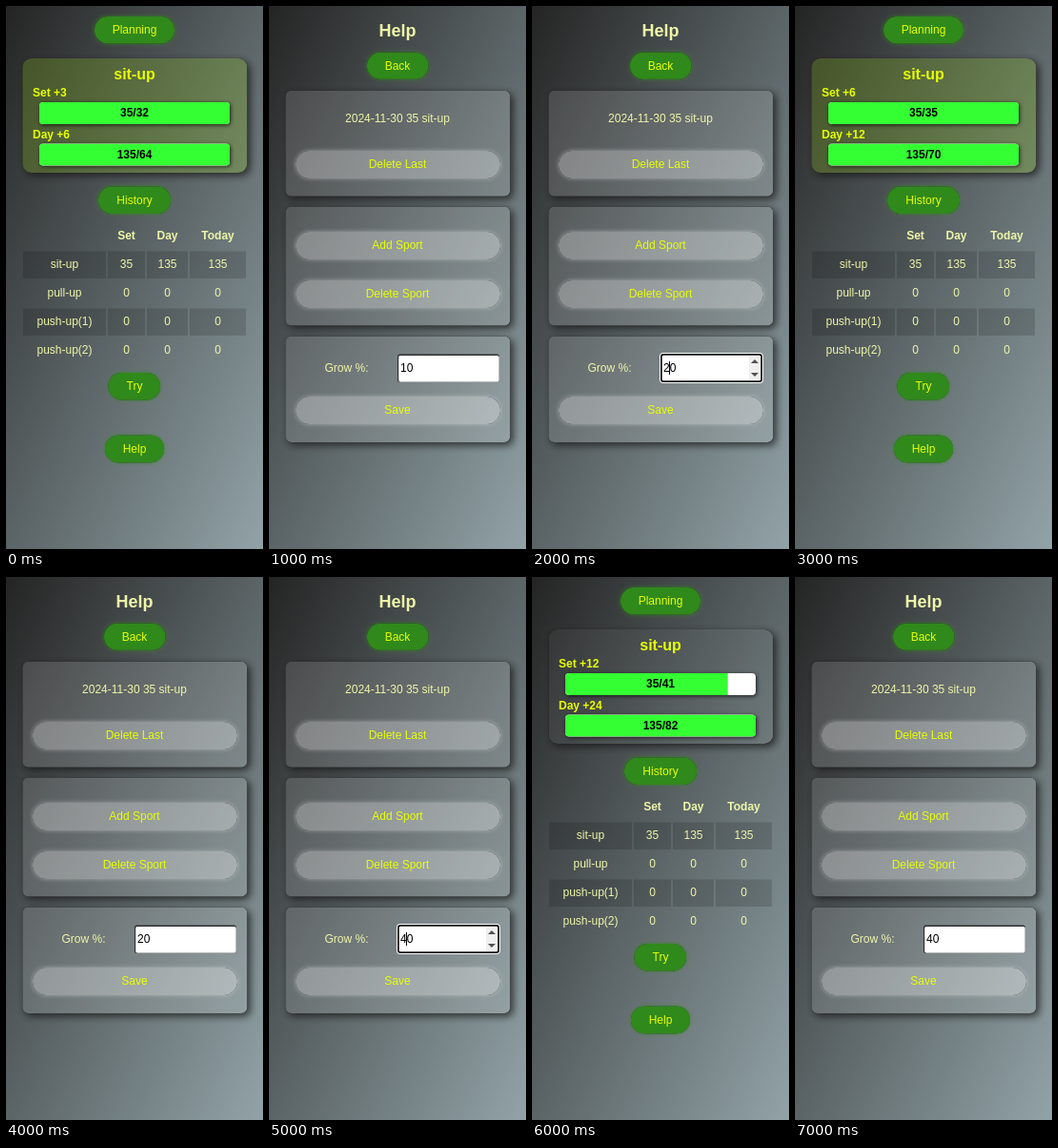
Recreate the animation shown at these times as an HTML page with a canvas. Size 270 by 570 pixels, loop 8000 ms.

```html
<!DOCTYPE html>
<html lang="en">
<head>
<meta charset="utf-8">
<title>Workout tracker</title>
<style>
html, body { margin: 0; width: 100%; height: 100%; overflow: hidden; background: #444; }
canvas { display: block; }
</style>
</head>
<body>
<canvas id="stage" width="270" height="570"></canvas>
<script>
const ctx = document.getElementById('stage').getContext('2d');
const LIME = '#e6ff00', PALE = '#eef5a8', GREEN = '#30891b';

// One scene per second; percent is the growth setting in force.
const SCENES = [
  { page: 'plan', percent: 10 },
  { page: 'help', percent: 10 },
  { page: 'help', percent: 20, focus: true },
  { page: 'plan', percent: 20 },
  { page: 'help', percent: 20 },
  { page: 'help', percent: 40, focus: true },
  { page: 'plan', percent: 40 },
  { page: 'help', percent: 40 }
];

function text(str, x, y, { color = PALE, size = 12, bold = false, align = 'center' } = {}) {
  ctx.font = `${bold ? 'bold ' : ''}${size}px "Liberation Sans", Arial, sans-serif`;
  ctx.fillStyle = color;
  ctx.textAlign = align;
  ctx.fillText(str, x, y);
}

function box(x, y, w, h, r, fill) {
  ctx.beginPath();
  ctx.roundRect(x, y, w, h, r);
  ctx.fillStyle = fill;
  ctx.fill();
}

// Shadow outside the box only, so translucent boxes stay clear of it.
function shadow(x, y, w, h, r, color, blur, offset = 0) {
  ctx.save();
  ctx.beginPath();
  ctx.rect(0, 0, 270, 570);
  ctx.roundRect(x, y, w, h, r);
  ctx.clip('evenodd');
  ctx.shadowColor = color;
  ctx.shadowBlur = blur;
  ctx.shadowOffsetX = ctx.shadowOffsetY = offset;
  box(x, y, w, h, r, '#000');
  ctx.restore();
}

function card(y, h, r, fill) {
  shadow(17.3, y, 236, h, r, 'rgba(20,20,20,.8)', 8, 3);
  box(17.3, y, 236, h, r, fill);
}

function pill(label, x, y, w, h = 28.5) {
  shadow(x, y, w, h, h / 2, 'rgba(48,137,27,.8)', 4);
  box(x, y, w, h, h / 2, GREEN);
  text(label, 135, Math.round(y) + 18, { color: LIME });
}

function wideButton(label, y) {
  shadow(28, y, 215, 29, 14.5, 'rgba(210,216,216,.55)', 4);
  box(28, y, 215, 29, 14.5, 'rgba(255,255,255,.28)');
  text(label, 135, Math.round(y) + 18, { color: LIME });
}

function background() {
  const g = ctx.createLinearGradient(0, 0, 441, 209);
  g.addColorStop(0, '#242424');
  g.addColorStop(.5, '#5b6466');
  g.addColorStop(1, '#92a3a7');
  ctx.fillStyle = g;
  ctx.fillRect(0, 0, 270, 570);
}

function progress(label, done, goal, y) {
  text(label, 28, y - 6, { color: LIME, bold: true, align: 'left' });
  shadow(35, y, 200, 23, 4, 'rgba(0,0,0,.75)', 4, 1);
  box(35, y, 200, 23, 4, '#fff');
  ctx.save();
  ctx.clip();
  ctx.fillStyle = '#33ff33';
  ctx.fillRect(35, y, 200 * Math.min(1, done / goal), 23);
  ctx.restore();
  text(`${done}/${goal}`, 135, y + 15, { color: '#000', bold: true });
}

function table() {
  const columns = [[18, 87, 61.5], [107, 39, 126.5], [148, 43, 169.5], [193, 59, 222.5]];
  const rows = [
    ['', 'Set', 'Day', 'Today'],
    ['sit-up', 35, 135, 135],
    ['pull-up', 0, 0, 0],
    ['push-up(1)', 0, 0, 0],
    ['push-up(2)', 0, 0, 0]
  ];
  rows.forEach((row, i) => row.forEach((cell, j) => {
    const [x, w, center] = columns[j];
    if (i % 2) {
      ctx.fillStyle = 'rgba(0,0,0,.15)';
      ctx.fillRect(x, 227.5 + 30 * i, w, 28.5);
    }
    text(String(cell), center, 245 + 30 * i, { bold: i === 0 });
  }));
}

function planPage({ percent }) {
  const extraSet = percent * .3, extraDay = percent * .6;
  const setGoal = 29 + Math.round(extraSet), dayGoal = 58 + Math.round(extraDay);
  const complete = 35 >= setGoal && 135 >= dayGoal;
  pill('Planning', 93, 11, 84);
  card(55, 120, 9, complete ? 'rgba(145,200,25,.25)' : 'rgba(255,255,255,.04)');
  text('sit-up', 135, 77, { color: LIME, size: 16, bold: true });
  progress(`Set +${Math.round(extraSet)}`, 35, setGoal, 101);
  progress(`Day +${Math.round(extraDay)}`, 135, dayGoal, 144.5);
  pill('History', 97, 189.5, 76);
  table();
  pill('Try', 107.5, 385, 54.5);
  pill('Help', 104, 450.7, 62);
}

function triangle(x, y, dy) {
  ctx.beginPath();
  ctx.moveTo(x - 4, y);
  ctx.lineTo(x + 4, y);
  ctx.lineTo(x, y + dy);
  ctx.fillStyle = '#505050';
  ctx.fill();
}

function numberInput(value, focus) {
  if (focus) {
    box(134, 364, 109, 32, 4, '#fff');
    box(135, 365, 107, 30, 3, '#101010');
    box(136.7, 366.7, 103.6, 26.6, 1.5, '#fff');
    ctx.fillStyle = '#efefef';
    ctx.fillRect(228, 367, 12, 26);
    triangle(234, 375, -4);
    triangle(234, 385, 4);
  } else {
    box(135, 365.5, 107, 29.5, 2.5, '#2e2e2e');
    box(136.3, 367, 105.7, 28, 2, '#b8b8b8');
    box(136.3, 367, 104.9, 27, 1.5, '#fff');
  }
  text(String(value), 138, 384, { color: '#000', align: 'left' });
  if (focus) {
    ctx.fillStyle = '#000';
    ctx.fillRect(144, 373, 1, 14);
  }
}

function helpPage({ percent, focus }) {
  const tint = 'rgba(255,255,255,.13)';
  text('Help', 135, 32, { size: 18, bold: true });
  pill('Back', 103, 48.8, 64.5, 28);
  card(88.7, 111, 6, tint);
  text('2024-11-30 35 sit-up', 135, 122);
  wideButton('Delete Last', 152);
  card(210.5, 125, 6, tint);
  wideButton('Add Sport', 237);
  wideButton('Delete Sport', 288);
  card(346.5, 111.5, 6, tint);
  text('Grow %:', 81.5, 384);
  numberInput(percent, focus);
  wideButton('Save', 410);
}

function draw(now) {
  const scene = SCENES[Math.floor(now / 1000) % SCENES.length];
  background();
  (scene.page === 'plan' ? planPage : helpPage)(scene);
}

const start = performance.now();
function tick() {
  draw(performance.now() - start);
  requestAnimationFrame(tick);
}
tick();
</script>
</body>
</html>
```
